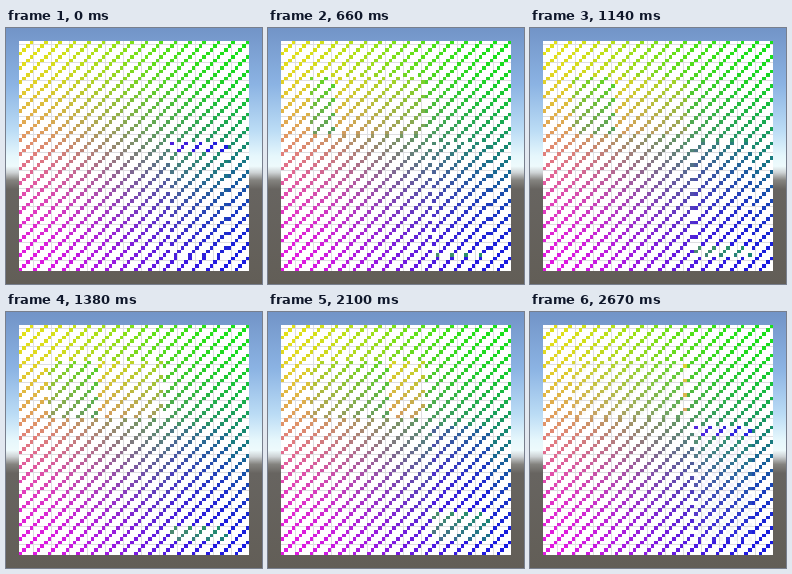
These frames come from a looping animation (256x256 px, 2700 ms). An HTML page with a canvas:

```html
<!DOCTYPE html>
<html lang="en">
<head>
<meta charset="utf-8">
<title>Scrolling pixel blocks</title>
<style>
html, body { margin: 0; width: 100%; height: 100%; overflow: hidden; }
canvas { display: block; width: 256px; height: 256px; }
</style>
</head>
<body>
<canvas id="stage" width="256" height="256"></canvas>
<script>
const SIZE = 256, LOOP = 2700, FRAME = 30, FADE_START = 2100;
const STEP = 92.8;
const CELLS = 64, ORIGIN = 12.8, CELL = 3.6;
const WIDE = { x: 8, y: 10, w: 32, h: 16 };
const TALL = { x: 42, y: 28, w: 16, h: 32 };

const ctx = document.getElementById('stage').getContext('2d');
const layer = document.createElement('canvas');
layer.width = layer.height = SIZE;
const layerCtx = layer.getContext('2d');

const mod = (n, m) => ((n % m) + m) % m;
const smooth = t => t * t * (3 - 2 * t);
const edge = i => Math.round(ORIGIN + i * CELL);
const inside = (r, x, y) => x >= r.x && x < r.x + r.w && y >= r.y && y < r.y + r.h;

const sky = ctx.createLinearGradient(0, 0, 0, SIZE);
[
  [0, '#7294c7'], [0.22, '#8bb3e3'], [0.4, '#bbdcf5'], [0.5, '#e6f7fc'],
  [0.54, '#eefafc'], [0.565, '#cdd2d4'], [0.595, '#84837f'], [0.63, '#676460'], [1, '#625e57']
].forEach(([at, color]) => sky.addColorStop(at, color));

function cellColor(x, y) {
  const u = smooth(x / (CELLS - 1)), v = smooth(y / (CELLS - 1));
  return `rgb(${[1 - u, 1 - v, v].map(c => Math.round(25 + c * 200)).join()})`;
}

function drawPanel(c, wideShift, tallShift) {
  const start = edge(0), end = edge(CELLS), size = end - start;
  c.fillStyle = '#fff';
  c.fillRect(start, start, size, size);

  // Faint seams between groups of five cells
  c.fillStyle = '#dedee1';
  for (let i = 4; i < CELLS; i += 5) c.fillRect(edge(i), start, 1, size);
  for (let i = 1; i < CELLS; i += 5) c.fillRect(start, edge(i), size, 1);

  for (let y = 0; y < CELLS; y++) {
    for (let x = 0; x < CELLS; x++) {
      let sx = x, sy = y;
      if (inside(WIDE, x, y)) sx = WIDE.x + mod(x - WIDE.x - wideShift, WIDE.w);
      else if (inside(TALL, x, y)) sy = TALL.y + mod(y - TALL.y + tallShift, TALL.h);
      if ((sx + sy) % 4 !== 3) continue;
      c.fillStyle = cellColor(sx, sy);
      c.fillRect(edge(x), edge(y), edge(x + 1) - edge(x), edge(y + 1) - edge(y));
    }
  }
}

function drawAt(c, time) {
  drawPanel(c, Math.floor(time / STEP), Math.floor(time / (2 * STEP) - 2.5));
}

function render(time) {
  ctx.globalAlpha = 1;
  ctx.fillStyle = sky;
  ctx.fillRect(0, 0, SIZE, SIZE);
  drawAt(ctx, time);
  // Blend into the motion that leads up to the start of the loop
  if (time > FADE_START) {
    drawAt(layerCtx, time - LOOP);
    ctx.globalAlpha = (time - FADE_START) / (LOOP - FADE_START);
    ctx.drawImage(layer, 0, 0);
  }
}

const begin = performance.now();
function tick() {
  const time = (performance.now() - begin) % LOOP;
  render(Math.floor(time / FRAME) * FRAME);
  requestAnimationFrame(tick);
}
tick();
</script>
</body>
</html>
```
